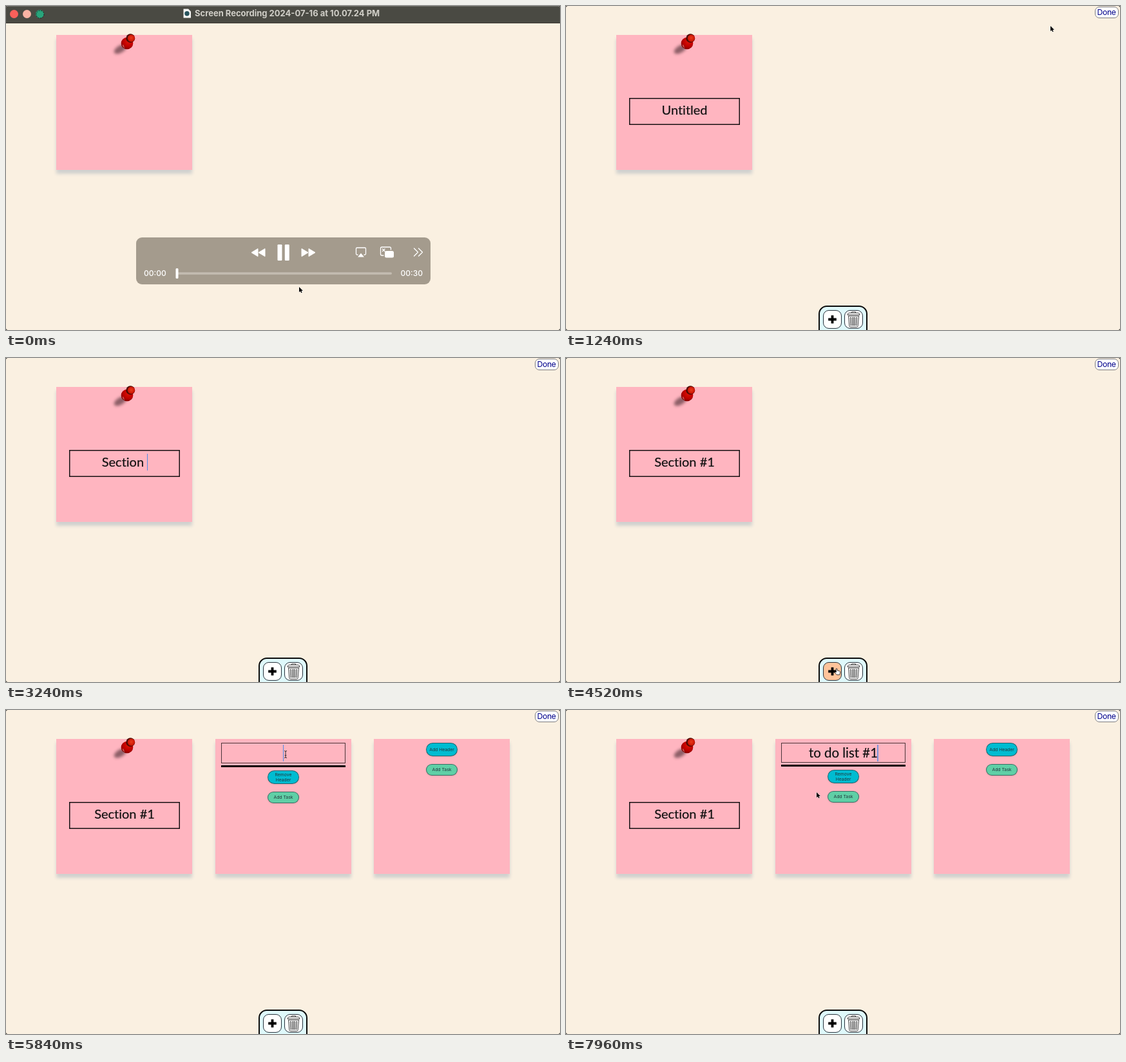
An HTML page that plays this animation: 860 px wide and 504 px high, repeating every 8000 ms.

```html
<!DOCTYPE html>
<html lang="en">
<head>
<meta charset="utf-8">
<title>Sticky note board</title>
<style>
html, body { margin: 0; width: 100%; height: 100%; overflow: hidden; background: #1d1d1b; }
#stage { position: absolute; left: 0; top: 0; width: 860px; height: 504px; overflow: hidden;
  background: #faf0e1; border-radius: 3px; font-family: Inter, Roboto, sans-serif; }
#stage div, #stage svg { position: absolute; box-sizing: border-box; }
svg { overflow: visible; }
.off { visibility: hidden; }

/* notes */
.card { top: 45px; width: 211px; height: 210px; background: #ffb5c0;
  box-shadow: 0 6px 5px #d0d1cf; }
.field { text-align: center; white-space: pre; color: #111; font: 20px/26px "Comic Sans MS", Lato, sans-serif;
  font-variant-ligatures: none; -webkit-text-stroke: .2px #111; }
.caret { position: relative; display: inline-block; width: 0; height: 0; }
.caret::after { content: ""; position: absolute; left: -.6px; top: -20px; width: 1.4px; height: 26px;
  background: #4f8be6; }
#titleBox { left: 20px; top: 98px; width: 172px; height: 42px; box-shadow: inset 0 0 0 1.5px #161012; padding-top: 5px; }
#headBox { left: 9px; top: 6px; width: 193px; height: 32px; border: 1px solid #4b363a; padding-top: 1px; font-size: 20.4px; }
#bar { left: 9px; top: 41px; width: 192.5px; height: 3px; background: #000; }
.pill { left: 81px; width: 49px; border: 1px solid rgba(35, 60, 65, .65); border-radius: 11px; color: #23343a;
  font-size: 6.8px; line-height: 8px; text-align: center; box-shadow: 0 1px 2px #dfa3ad;
  display: flex; align-items: center; justify-content: center; }
.add { background: #00bcd1; height: 21px; top: 6px; }
.task { background: #5fcfa6; height: 18px; top: 39px; }
#remove { background: #ff6464; height: 21px; top: 49px; animation: recolor 8s linear infinite; }
@keyframes recolor { 0%, 69.5% { background: #00bcd1; } 72.5%, 100% { background: #ff6464; } }

/* page buttons */
.btn { top: 1px; height: 17.5px; background: #fff; border: 1px solid #7c7c80; border-radius: 7px;
  color: #00008b; font-size: 12.2px; letter-spacing: -.35px; line-height: 16px; text-align: center; white-space: nowrap; }
#tools { left: 392px; top: 466px; width: 76px; height: 50px; background: #dff9fb;
  border: 2px solid #0b0b0b; border-radius: 13px; }
.tool { top: 5px; width: 29px; height: 29px; background: #fff; border: 1px solid #26333d; border-radius: 9px; }
.tool svg { left: 0; top: 0; }
.tool.hot { background: #fec49b; }

/* player chrome */
#chrome { inset: 0; animation: vanish 8s linear infinite; }
@keyframes vanish { 0%, .5% { opacity: 1; } 4.2%, 100% { opacity: 0; } }
#top { left: 0; top: 0; width: 860px; height: 27px; background: #4a4a43;
  border-top: 1px solid #6d6c66; border-bottom: 1px solid #3a3933; }
.light { top: 5px; width: 13px; height: 13px; border-radius: 50%; }
#name { left: 293px; top: 2px; color: #d1cfc8; font-size: 13px; font-weight: 700; line-height: 16px; white-space: nowrap; }
#panel { left: 202px; top: 360px; width: 457px; height: 73px; border-radius: 9px; background: #a49b8d; }
.clock { top: 48px; color: #fff; font-size: 12px; font-weight: 500; line-height: 16px; }

/* pointer */
#pointer { left: 0; top: 0; width: 1px; height: 1px; animation: roam 8s infinite cubic-bezier(.4, .1, .5, .95); }
@keyframes roam {
  0%, .5% { transform: translate(455px, 437px); }
  5% { transform: translate(731px, 222px); }
  10%, 13.5% { transform: translate(841px, 8px); }
  23%, 46% { transform: translate(206px, 172px); }
  55.5%, 61.5% { transform: translate(420px, 483px); }
  68.5%, 70.5% { transform: translate(429px, 62px); }
  72.5%, 96% { transform: translate(434px, 69px); }
  99.5%, 100% { transform: translate(389px, 128px); }
}
</style>
</head>
<body>
<div id="stage">
  <div class="card" style="left:78px">
    <div class="field" id="titleBox"><span></span><i class="caret"></i><span></span></div>
    <svg width="1" height="1" style="left:-78px;top:-45px">
      <defs>
        <radialGradient id="ball" cx=".6" cy=".35" r=".7">
          <stop offset="0" stop-color="#dc1407"/><stop offset=".6" stop-color="#be0000"/><stop offset="1" stop-color="#7d0000"/>
        </radialGradient>
        <radialGradient id="knob" cx=".5" cy=".45" r=".6">
          <stop offset="0" stop-color="#e8391a"/><stop offset=".7" stop-color="#cf1a06"/><stop offset="1" stop-color="#8c0a00"/>
        </radialGradient>
        <filter id="soft" x="-50%" y="-50%" width="200%" height="200%"><feGaussianBlur stdDeviation="2.2"/></filter>
      </defs>
      <ellipse cx="177.5" cy="67" rx="11" ry="5.5" transform="rotate(-32 177.5 67)" fill="#4a2b30" opacity=".62" filter="url(#soft)"/>
      <circle cx="188" cy="58" r="9.3" fill="url(#ball)"/>
      <circle cx="193.2" cy="50.2" r="6.9" fill="#4c0b06"/>
      <circle cx="194.4" cy="50.2" r="5.7" fill="url(#knob)"/>
      <path d="M181.6 60.5q.4 2.6 2 4" fill="none" stroke="#f3b7b0" stroke-width=".9"/>
    </svg>
  </div>

  <div class="card" id="second" style="left:325px">
    <div id="plain">
      <div class="pill add">Add Header</div>
      <div class="pill task">Add Task</div>
    </div>
    <div id="headed">
      <div class="field" id="headBox"><span></span><i class="caret"></i><span></span></div>
      <div id="below">
        <div id="bar"></div>
        <div class="pill" id="remove">Remove<br>Header</div>
        <div class="pill task" style="top:82px">Add Task</div>
      </div>
    </div>
  </div>

  <div class="card" id="third" style="left:571px">
    <div class="pill add">Add Header</div>
    <div class="pill task">Add Task</div>
  </div>

  <div class="btn" id="back" style="left:0;width:76.5px">&lt; Dashboard</div>
  <div class="btn" id="edit" style="left:828.5px;width:29px">Edit</div>
  <div class="btn" id="done" style="left:820.5px;width:37px">Done</div>

  <div id="tools">
    <div class="tool" id="plus" style="left:5px">
      <svg width="27" height="27"><path d="M13.500 7.200v12.600M7.200 13.500h12.600" stroke="#000" stroke-width="3.800"/></svg>
    </div>
    <div class="tool" style="left:38px">
      <svg width="27" height="27" fill="none" stroke="#333" stroke-width=".9">
        <path d="M10.500 3.500V1.800h6v1.700M4 6.500q0-3 3-3h13q3 0 3 3zM4.800 8.300h17.400M5.500 8.500l1.300 15q.2 2 2 2h9.400q1.800 0 2-2l1.300-15"/>
        <path id="slots" d="M8 10.500l.8 12.500h1.300l-.6-12.500zM11.500 10.500l.2 12.500h1.300v-12.500z" stroke-width=".7"/>
        <use href="#slots" transform="matrix(-1 0 0 1 27 0)"/>
      </svg>
    </div>
  </div>

  <div id="chrome">
    <div id="top">
      <div class="light" style="left:6px;background:#fb605a"></div>
      <div class="light" style="left:26px;background:#f9b3a4"></div>
      <div class="light" style="left:46px;background:#29a47b"></div>
      <svg width="1" height="1" style="left:0;top:-1px">
        <circle cx="53" cy="13" r="6" fill="none" stroke="#13251f" stroke-dasharray="2 1.6"/>
        <path d="M275.5 4.500h7.500l4 4v10h-11.500z" fill="#f6f6f4"/>
        <circle cx="281" cy="11.700" r="3.700" fill="#27535d"/>
      </svg>
      <div id="name">Screen Recording 2024-07-16 at 10.07.24 PM</div>
    </div>
    <div id="panel">
      <svg width="1" height="1" style="left:-202px;top:-360px" fill="#fff">
        <path id="skip" stroke="#fff" stroke-linejoin="round" d="M459 377.500v12l10-6zM470 377.500v12l10-6z"/>
        <use href="#skip" transform="matrix(-1 0 0 1 861 0)"/>
        <rect x="421.5" y="371" width="7" height="25" rx="1.3"/>
        <rect x="432.8" y="371" width="7" height="25" rx="1.3"/>
        <g fill="none" stroke="#fff" stroke-width="1.3" stroke-linecap="round" stroke-linejoin="round">
          <path d="M546 387h-1q-1.500 0-1.500-1.500v-8q0-1.500 1.500-1.500h12q1.500 0 1.500 1.500v8q0 1.500-1.500 1.500h-1"/>
          <path d="M586 388h-2.500q-2 0-2-2v-9q0-2 2-2h12q2 0 2 2v2M584.500 378l3.500 3.500M588 378l-3.500 3.500"/>
          <path d="M633.500 377l6 6-6 6M640.500 377l6 6-6 6"/>
        </g>
        <path d="M551 384.500l5 6h-10z"/>
        <rect x="588" y="381" width="14" height="10.5" rx="2.5"/>
        <rect x="265" y="414.3" width="334" height="3.4" rx="1.7" fill="#c3bcb1"/>
        <rect x="263.5" y="408" width="4" height="16" rx="1.5"/>
      </svg>
      <div class="clock" style="left:12px">00:00</div>
      <div class="clock" style="right:12px">00:30</div>
    </div>
  </div>

  <div id="pointer">
    <svg width="1" height="1" style="left:0;top:0">
      <path id="arrow" d="M0 0V8.200L1.900 6.500 3.200 9.300 4.600 8.700 3.400 5.900H5.900Z" fill="#000" stroke="#fff" stroke-width=".8" paint-order="stroke"/>
      <path id="beam" d="M-2-5.500Q0-5.500 0-4V4Q0 5.500-2 5.500M2-5.500Q0-5.500 0-4M0 4Q0 5.500 2 5.500M-1.300 1.500H1.300" fill="none" stroke="#222" stroke-width=".9"/>
      <path id="hand" d="M-.9.500Q0-.600.900.500L1.400 3.300 4.800 4Q6 4.500 5.700 6L4.800 9.800H.300L-2.900 6Q-2.500 4.600-.500 5.700Z" fill="#fff" stroke="#111" stroke-width=".8"/>
    </svg>
  </div>
</div>

<script>
const LOOP = 8000;
const $ = id => document.getElementById(id);
const show = (id, on) => $(id).classList.toggle("off", !on);
const latest = (steps, t) => steps.filter(s => s[0] <= t).pop();

// One step per key: "<" deletes the last letter.
function keys(text, log, times, strokes) {
  times.forEach((time, i) => {
    text = strokes[i] === "<" ? text.slice(0, -1) : text + strokes[i];
    log.push([time, text, ""]);
  });
  return log;
}

const title = keys("Untitled", [[0, "Unti", "tled"], [1880, "Unti", "tled"], [2320, "Untitled", ""]],
  [2360, 2400, 2440, 2480, 2520, 2560, 2600, 2640, 2720, 2800, 2860, 2920, 2980, 3040, 3080, 3120, 3360, 3480],
  "<<<<<<<<Section #1");
const header = keys("", [[0, "", ""], [5560, "", ""]],
  [6040, 6120, 6200, 6400, 6500, 6600, 6700, 6800, 6880, 6980, 7100, 7280, 7440],
  "to do list #1");

const kinds = [[0, "arrow"], [760, "hand"], [1120, "arrow"], [1760, "beam"], [2320, ""],
  [3680, "beam"], [3840, "arrow"], [4400, "hand"], [5000, "arrow"], [5440, "hand"],
  [5680, "beam"], [6040, ""], [7680, "beam"], [7760, "arrow"]];

// Caret is lit for half a second after each key, then fades out and in.
function blink(age) {
  const phase = age % 1000;
  const glow = phase < 700 ? (640 - phase) / 160 : (phase - 900) / 100;
  return Math.max(0, Math.min(1, glow));
}

function field(id, steps, t, from, to) {
  const [time, before, after] = latest(steps, t);
  const [a, caret, b] = $(id).children;
  a.textContent = before;
  b.textContent = after;
  caret.style.opacity = t >= from && t < to ? blink(t - time) : 0;
  return before;
}

let start;
function draw(now) {
  start ??= now;
  const t = (now - start) % LOOP;
  const editing = t >= 1000;
  const headed = t >= 5560;
  show("back", !editing);
  show("edit", !editing);
  show("done", editing);
  show("tools", editing);
  show("titleBox", editing);
  $("second").style.display = t >= 4600 ? "" : "none";
  show("third", t >= 4880);
  show("plain", !headed);
  show("headed", headed);
  $("plus").classList.toggle("hot", t >= 4400 && t < 5000);

  field("titleBox", title, t, 1880, 4480);
  const lift = field("headBox", header, t, 5560, LOOP) ? 1 : 0;
  $("below").style.top = -lift + "px";
  $("headBox").style.height = 32 - lift + "px";
  $("remove").style.animationDelay = "0s";

  const kind = latest(kinds, t)[1];
  for (const id of ["arrow", "beam", "hand"]) show(id, id === kind);
  requestAnimationFrame(draw);
}
requestAnimationFrame(draw);
</script>
</body>
</html>
```
